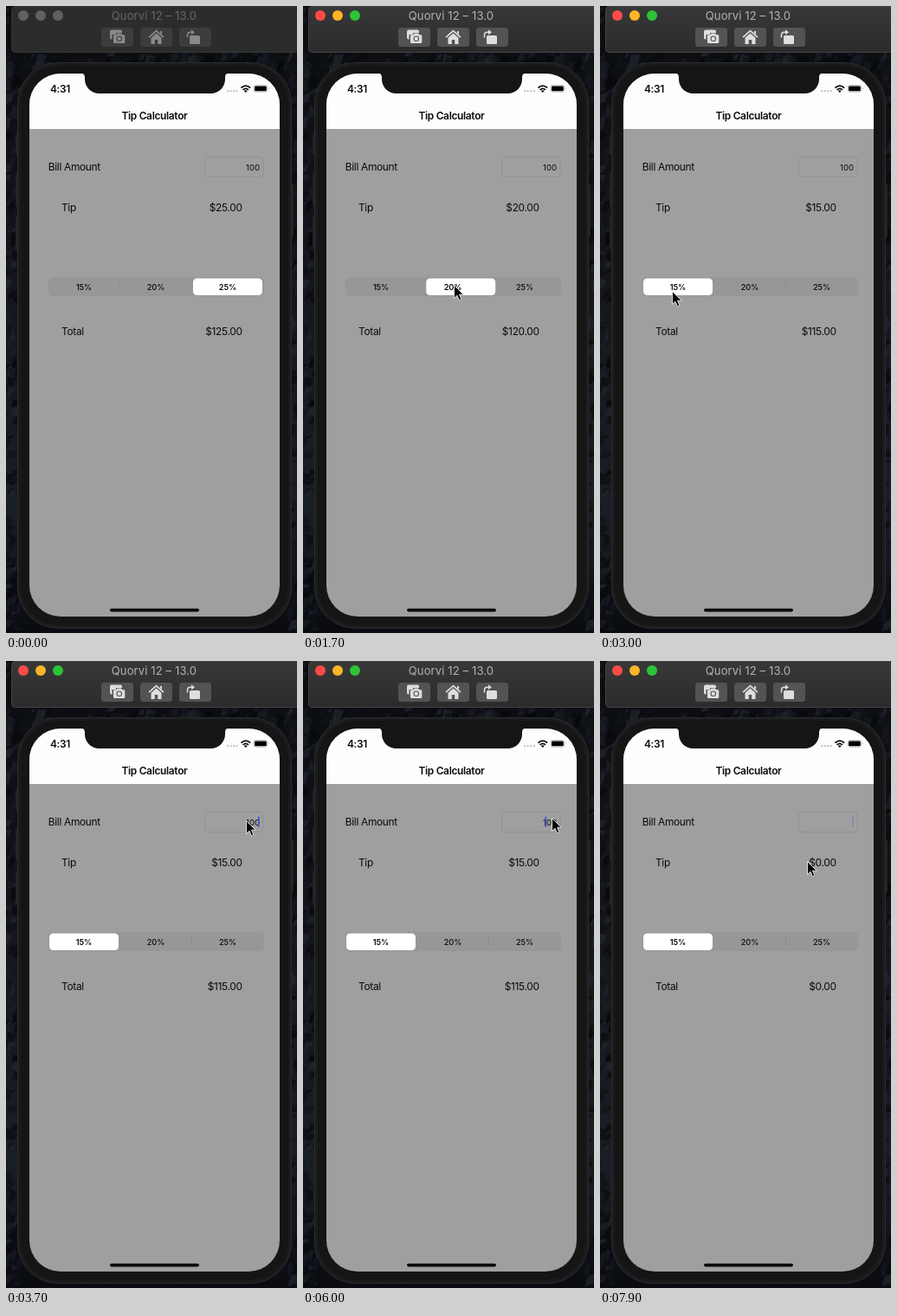
Animation, 336 px wide and 724 px high, one loop 8000 ms. Source, as an HTML page:

```html
<!DOCTYPE html>
<html lang="en">
<head>
<meta charset="utf-8">
<title>Tip Calculator</title>
<style>
  html, body { margin: 0; width: 100%; height: 100%; overflow: hidden; background: #0c0e13; }
  svg { display: block; width: 336px; height: 724px; }
  text { font-family: Inter, sans-serif; font-size: 11.9px; letter-spacing: -.026em; fill: #0a0a0a; }
  .bold { font-weight: 600; }
  .mid { text-anchor: middle; }
  .end { text-anchor: end; }
  .small { font-size: 9.2px; font-weight: 500; letter-spacing: -.01em; }
  .small.on { font-weight: 600; }
  #bill { font-size: 9.6px; letter-spacing: 0; }
  #bar { fill: #2b2d2c; stroke: #343635; }
  #title { font-size: 13px; letter-spacing: .01em; fill: #656867; }
  #lights circle { fill: #5f6160; }
  .button { fill: #3b3d3c; }
  .glyph { fill: #888a89; }
  .arrow { fill: none; stroke: #888a89; }
  .cut { fill: #3b3d3c; }
  .active #bar { fill: url(#metal); stroke: #414142; }
  .active #title { fill: #b3b3b4; }
  .active #lights :nth-child(1) { fill: #ff4b47; }
  .active #lights :nth-child(2) { fill: #fdb427; }
  .active #lights :nth-child(3) { fill: #2dc337; }
  .active .button, .active .cut { fill: #535354; }
  .active .glyph { fill: #dededf; }
  .active .arrow { fill: none; stroke: #dededf; }
</style>
</head>
<body>
<svg id="stage" viewBox="0 0 336 724" xmlns="http://www.w3.org/2000/svg">
  <defs>
    <linearGradient id="night" x2="0" y2="1">
      <stop offset="0" stop-color="#0b0c10"/>
      <stop offset=".4" stop-color="#13151b"/>
      <stop offset=".8" stop-color="#1a1e27"/>
      <stop offset="1" stop-color="#090b10"/>
    </linearGradient>
    <linearGradient id="metal" x2="0" y2="1">
      <stop offset="0" stop-color="#383839"/>
      <stop offset="1" stop-color="#2b2b2c"/>
    </linearGradient>
    <clipPath id="screen"><rect x="27" y="78" width="289" height="627" rx="36"/></clipPath>
  </defs>

  <rect width="336" height="724" fill="url(#night)"/>
  <g id="rocks"></g>

  <!-- window bar -->
  <rect id="bar" x="6.5" y=".5" width="340" height="53" rx="4"/>
  <g id="lights"><circle cx="20" cy="11" r="6"/><circle cx="40" cy="11" r="6"/><circle cx="60" cy="11" r="6"/></g>
  <text id="title" class="mid" x="171" y="16">Quorvi 12 – 13.0</text>
  <g class="button">
    <rect x="110" y="25" width="37" height="22" rx="3.5"/>
    <rect x="155" y="25" width="37" height="22" rx="3.5"/>
    <rect x="200" y="25" width="37" height="22" rx="3.5"/>
  </g>
  <g class="glyph">
    <rect x="120" y="27.5" width="14" height="11" rx="2"/>
    <path class="cut" d="M122.5 43V33h4l1-2h10v12z"/>
    <path d="M124 34.5q0-1.2 1.2-1.2h2.2l1.3-1.8h4.3l1.3 1.8h1.8q1.2 0 1.2 1.2v7.3q0 1.2-1.2 1.2h-10.900q-1.2 0-1.2-1.2z"/>
    <circle class="cut" cx="130.8" cy="37.8" r="3.3"/><circle cx="130.8" cy="37.8" r="2.2"/>
    <path d="M173.500 27.500l9 8-1.200 1.300-7.800-7-7.800 7-1.200-1.300zM178 29h2v4l-2-2zM173.500 31.500l6 5.300V44h-4.300v-5h-3.400v5h-4.300v-7.200z"/>
    <rect x="212" y="34" width="12" height="10" rx="1.500"/>
    <path d="M214 27.200l4 3-4 3z"/>
  </g>
  <path class="arrow" d="M209.500 36.500v-3q0-3.300 3.300-3.300h2" stroke-width="1.500"/>

  <!-- phone -->
  <g fill="#202124">
    <rect x="11" y="149" width="4" height="23" rx="1"/>
    <rect x="11" y="193" width="4" height="39" rx="1"/>
    <rect x="11" y="242" width="4" height="39" rx="1"/>
    <rect x="328" y="206" width="4" height="61" rx="1"/>
  </g>
  <rect x="13.500" y="65.500" width="316" height="653" rx="47" fill="#1b1b1c" stroke="#2c2d30"/>
  <rect x="17" y="69" width="309" height="646" rx="44" fill="#151516"/>
  <g clip-path="url(#screen)">
    <rect x="27" y="78" width="289" height="627" fill="#9f9f9f"/>
    <rect x="27" y="78" width="289" height="64" fill="#fdfdfd"/>
  </g>
  <path d="M86 77.500q5 0 5 5v2a16.500 16.500 0 0 0 16.500 16.500h129a16.500 16.500 0 0 0 16.500-16.500v-2q0-5 5-5z" fill="#151516"/>
  <rect x="120" y="695.800" width="103" height="3.600" rx="1.800" fill="#0b0b0b"/>

  <!-- status icons -->
  <path d="M256.200 98.200h12" stroke="#bdbdbd" stroke-width="2.200" stroke-linecap="round" stroke-dasharray="0 3.500"/>
  <path d="M271.500 94.500q5.300-4.800 10.600 0M273.600 96.800q3.200-2.800 6.400 0" fill="none" stroke="#0a0a0a" stroke-width="1.700"/>
  <path d="M276.800 100.100l-1.900-2q1.900-1.500 3.800 0z"/>
  <rect x="286" y="91.600" width="15.800" height="7.600" rx="2.200" fill="none" stroke="#a8a8a8" stroke-width=".7"/>
  <rect x="287" y="92.600" width="13.800" height="5.600" rx="1.300"/>
  <path d="M302.800 94.100q1.600 1.300 0 2.600z" fill="#a0a0a0"/>

  <!-- app -->
  <text class="bold" x="51" y="99.800">4:31</text>
  <text class="bold mid" x="171.500" y="131.200">Tip Calculator</text>
  <text x="48.800" y="190.300">Bill Amount</text>
  <text x="64" y="237.300">Tip</text>
  <text x="64" y="380.300">Total</text>
  <rect x="229.500" y="174.500" width="67.500" height="23" rx="3.500" fill="none" stroke="#919193" stroke-width=".9"/>
  <text id="bill" class="end" x="293" y="189.600"></text>
  <rect id="caret" y="179.500" width="1.600" height="12.500" rx=".8" fill="#4350c8"/>
  <text id="tip" class="end" x="272.700" y="237.300"></text>
  <text id="total" class="end" x="272.700" y="380.300"></text>
  <rect x="49" y="313" width="249" height="22" rx="5.500" fill="#979798"/>
  <rect class="divider" x="131" y="318" width=".8" height="12" fill="#8a8a8b"/>
  <rect class="divider" x="214" y="318" width=".8" height="12" fill="#8a8a8b"/>
  <rect id="pill" y="314.500" width="80" height="19.500" rx="4.500" fill="#fff"/>
  <text class="small mid segment" x="90" y="327.600">15%</text>
  <text class="small mid segment" x="173" y="327.600">20%</text>
  <text class="small mid segment" x="256" y="327.600">25%</text>

  <path id="pointer" d="M.5.5v15l3.500-3.300 2.400 5.600 2.500-1.100-2.400-5.500h4.700z" fill="#000" stroke="#eee" stroke-width=".9" stroke-linejoin="round"/>
</svg>

<script>
const LOOP = 8000, STEP = 100, SLIDE = 300;
const RATES = [0.15, 0.2, 0.25];
const $ = id => document.getElementById(id);
const all = selector => [...document.querySelectorAll(selector)];
const segments = all('.segment'), dividers = all('.divider');

// Each track is a list of [time, value].
const choices = [[0, 2], [1500, 1], [2700, 0]];
const bills = [[0, '100'], [6500, '10'], [6700, '1'], [6900, '']];
const caretPlaces = [[0, 291], [4500, 275.5], [5700, 279.5], [6300, 291]];
const caretAlpha = [
  [0, 0], [2100, 0], [2200, 1], [2700, 1], [2900, 0], [3200, 0], [3400, 1], [3900, 1],
  [4200, 0], [4400, 0], [4500, 1], [5000, 1], [5200, 0], [5600, 0], [5700, 1],
  [7400, 1], [7600, 0], [7800, 0], [7900, .3]
];
const pointerX = [
  [600, 342], [1200, 224], [1500, 174], [1900, 174], [2400, 83], [3000, 83], [3500, 277],
  [3700, 277], [4300, 283], [5700, 283], [6000, 287], [7400, 287], [7900, 239]
];
const pointerY = [
  [600, 238], [1200, 281], [1500, 322], [1900, 322], [2400, 329], [3000, 329], [3500, 184],
  [3700, 184], [4300, 187], [5700, 187], [6000, 181], [7400, 181], [7900, 231]
];

const latest = (track, t) => track.filter(([time]) => time <= t).pop();

function tween(track, t) {
  const next = track.findIndex(([time]) => time > t);
  if (next < 0) return track[track.length - 1][1];
  if (next === 0) return track[0][1];
  const [t0, a] = track[next - 1], [t1, b] = track[next];
  return a + (b - a) * (t - t0) / (t1 - t0);
}

function slidingChoice(t) {
  const [start, value] = latest(choices, t);
  if (!start) return value;
  const p = Math.min(1, (t - start) / SLIDE);
  return value + (1 - p) ** 2;
}

function drawRocks() {
  let seed = 29;
  const random = () => (seed = seed * 16807 % 2147483647) / 2147483647;
  const tones = ['#06080c', '#191c23', '#101217', '#22262e', '#090b0f', '#15181f'];
  const rock = (x, y) => {
    const w = 3 + random() * 8, h = 3 + random() * 9, lean = random() * 8 - 4;
    const tone = tones[Math.floor(random() * tones.length)];
    return `<path d="M${x} ${y}l${w} ${lean}l${-w / 3} ${h}l${-w} ${h / 3}z" fill="${tone}" opacity=".7"/>`;
  };
  let art = '';
  for (let i = 0; i < 190; i++) art += rock(random() * 18 - 4, random() * 724);
  for (let i = 0; i < 110; i++) art += rock(random() * 336, 52 + random() * 18);
  for (let i = 0; i < 90; i++) art += rock(326 + random() * 10, 54 + random() * 670);
  $('rocks').innerHTML = art;
}

function render(t) {
  const choice = latest(choices, t)[1], bill = latest(bills, t)[1];
  const tip = bill * RATES[choice];
  $('stage').classList.toggle('active', t >= 1500);
  $('bill').textContent = bill;
  $('tip').textContent = '$' + tip.toFixed(2);
  $('total').textContent = '$' + (+bill + tip).toFixed(2);
  $('pill').setAttribute('x', 50 + 83 * slidingChoice(t));
  segments.forEach((label, i) => label.classList.toggle('on', i === choice));
  dividers.forEach((line, i) => line.setAttribute('opacity', choice === i || choice === i + 1 ? 0 : 1));

  $('caret').setAttribute('x', latest(caretPlaces, t)[1]);
  $('caret').setAttribute('opacity', tween(caretAlpha, t));
  $('pointer').setAttribute('transform', `translate(${tween(pointerX, t)} ${tween(pointerY, t)})`);
}

function tick() {
  const t = performance.now() % LOOP;
  render(Math.floor(t / STEP) * STEP);
  requestAnimationFrame(tick);
}

drawRocks();
tick();
</script>
</body>
</html>
```
